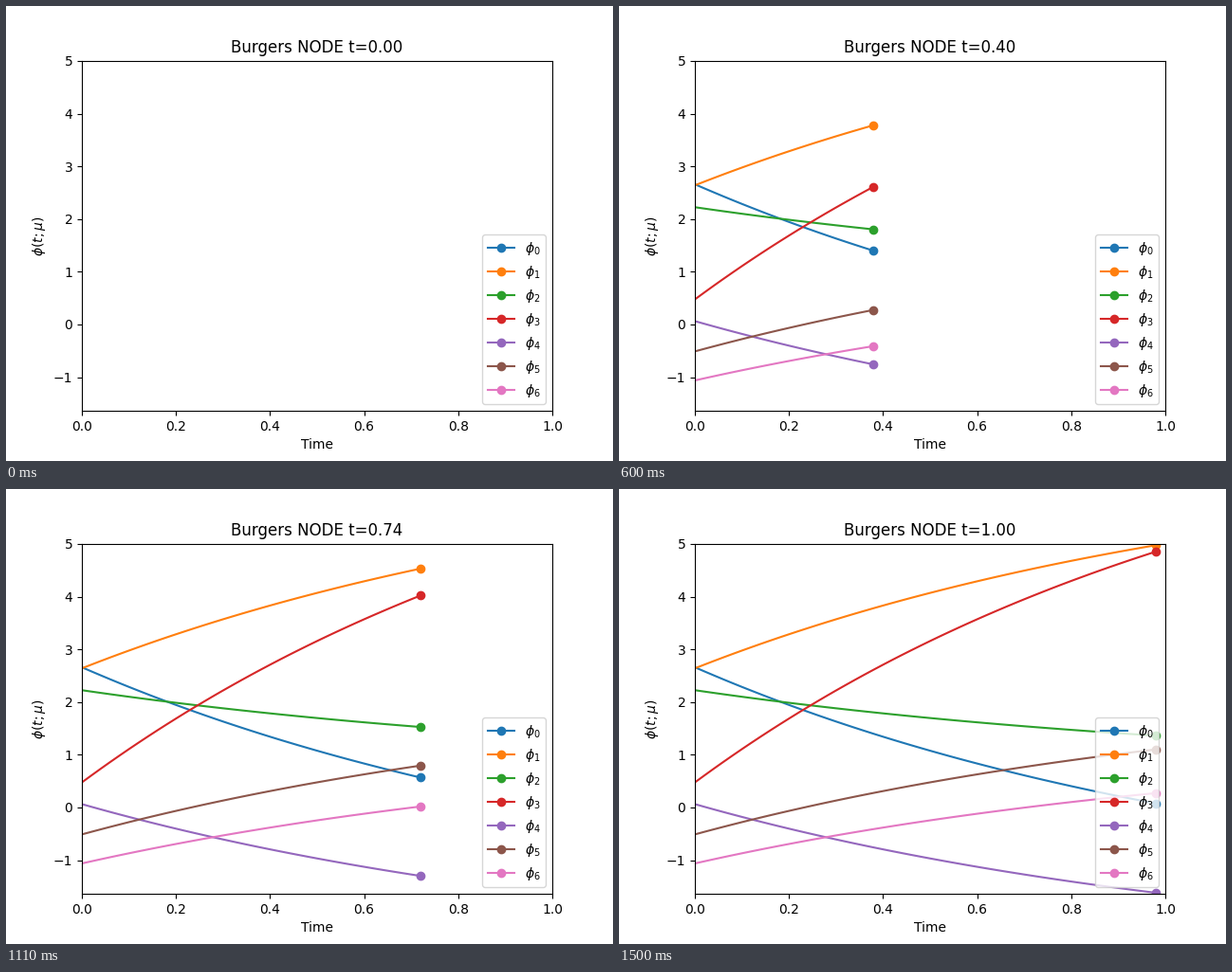
These frames come from a looping animation (640x480 px, 1530 ms). A matplotlib script:

```python
import matplotlib.pyplot as plt
import numpy as np
from matplotlib.animation import FuncAnimation

STEPS = 51
INTERVAL = 30
DECAY = 0.85

# Value of each mode at t=0 and t=1.
START = np.array([2.66, 2.64, 2.225, 0.476, 0.064, -0.51, -1.061])
END = np.array([0.043, 5.006, 1.352, 4.911, -1.64, 1.122, 0.29])

# All modes relax exponentially at one shared rate.
t = np.linspace(0, 1, STEPS)
ease = np.expm1(-DECAY * t) / np.expm1(-DECAY)
modes = START[:, None] + np.outer(END - START, ease)

fig, ax = plt.subplots(figsize=(6.4, 4.8), dpi=100)
lines = [
    ax.plot([], [], "-o", label=rf"$\phi_{k}$")[0] for k in range(len(modes))
]
ax.set_xlim(0, 1)
ax.set_ylim(modes.min(), modes.max())
ax.set_xlabel("Time")
ax.set_ylabel(r"$\phi(t;\mu)$")
ax.legend(loc="lower right")
title = ax.set_title("Burgers NODE t=0.00")


def update(i):
    """Draw the first i samples, with a marker on the newest one."""
    for line, mode in zip(lines, modes):
        line.set_data(t[:i], mode[:i])
        line.set_markevery((max(i - 1, 0), 1))
    title.set_text(f"Burgers NODE t={t[i]:.2f}")
    return [*lines, title]


anim = FuncAnimation(
    fig, update, frames=STEPS, interval=INTERVAL, repeat=True, repeat_delay=0
)
plt.show()
```
